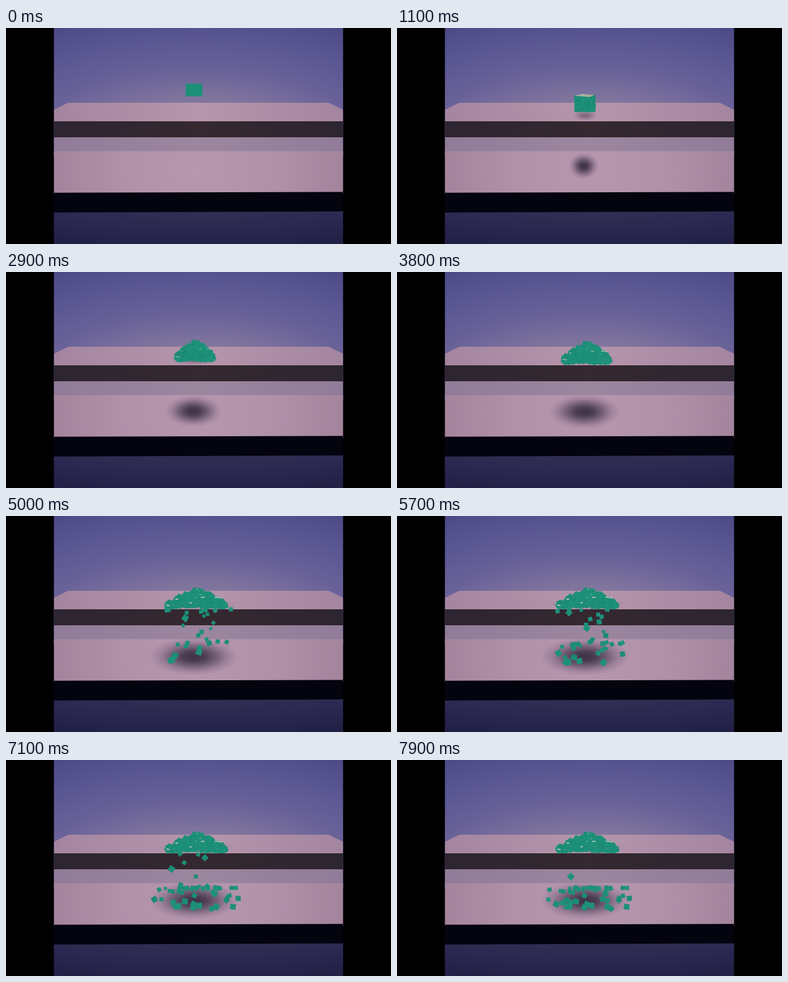
Recreate the animation shown at these times as an HTML page with a canvas. Size 600 by 338 pixels, loop 8 s.

```html
<!DOCTYPE html>
<html lang="en">
<head>
<meta charset="utf-8">
<title>Falling cubes</title>
<style>
html, body { margin: 0; width: 100%; height: 100%; overflow: hidden; background: #000; }
canvas { display: block; width: 600px; height: 338px; }
</style>
</head>
<body>
<canvas id="stage" width="600" height="338"></canvas>
<script>
const ctx = document.getElementById('stage').getContext('2d');
const LOOP = 8000, STEP = 100;
const LAND = 1100, SETTLED = 5000;
const LEFT = 74.67, RIGHT = 525.33, EDGE_Y = 146;

let seed = 71;
const rand = () => (seed = (seed * 16807) % 2147483647) / 2147483647;
const range = (a, b) => a + (b - a) * rand();
const bell = spread => (rand() + rand() + rand() - 1.5) * spread;
const mix = (a, b, p) => a + (b - a) * p;
const clamp = (v, a = 0, b = 1) => Math.min(b, Math.max(a, v));

const heapCubes = Array.from({ length: 230 }, (_, i) => ({
  u: rand(), v: rand(), angle: range(-.8, .8), scale: range(.7, 1.15),
  pale: i % 9 === 0, tint: range(-4, 4)
}));

// Cubes spill steadily over the edge, with a few late stragglers.
const SPILLED = 62;
const spillCubes = Array.from({ length: SPILLED }, (_, i) => {
  const q = i / SPILLED, depth = rand() ** 2.5, x0 = 291 + bell(50);
  return {
    start: 3900 + 2500 * q + 1100 * q ** 6,
    x0, x1: x0 + bell(mix(40, 90, depth)), y1: 200 + 34 * depth,
    size: range(4.5, 7) + 3 * depth, angle: range(-.6, .6), spin: range(-4, 4), tint: range(-4, 4)
  };
}).sort((a, b) => a.y1 - b.y1);

function shape(points, fill) {
  ctx.fillStyle = fill;
  ctx.beginPath();
  points.forEach(([x, y]) => ctx.lineTo(x, y));
  ctx.closePath();
  ctx.fill();
}

const slab = (top, bottom, fill) =>
  shape([[LEFT, top], [RIGHT, top], [RIGHT, bottom], [LEFT, bottom]], fill);

function addStops(gradient, colors) {
  colors.forEach((color, i) => gradient.addColorStop(i / (colors.length - 1), color));
  return gradient;
}

const across = (edge, middle) =>
  addStops(ctx.createLinearGradient(LEFT, 0, RIGHT, 0), [edge, middle, edge]);

// Elliptical gradient filling the area between two heights.
function glow(cy, ry, aspect, top, bottom, colors) {
  ctx.save();
  ctx.translate(300, cy);
  ctx.scale(aspect, 1);
  ctx.fillStyle = addStops(ctx.createRadialGradient(0, 0, 0, 0, 0, ry), colors);
  ctx.fillRect(-300 / aspect, top - cy, 600 / aspect, bottom - top);
  ctx.restore();
}

function blob(x, y, rx, ry, strength) {
  ctx.save();
  ctx.translate(x, y);
  ctx.scale(rx, ry);
  ctx.globalAlpha = strength;
  ctx.fillStyle = addStops(ctx.createRadialGradient(0, 0, 0, 0, 0, 1), [
    'rgba(40,32,50,1)', 'rgba(44,35,55,.9)', 'rgba(56,45,70,.62)', 'rgba(70,56,84,.25)', 'rgba(90,72,105,0)'
  ]);
  ctx.fillRect(-1, -1, 2, 2);
  ctx.restore();
}

function cube(x, y, size, angle, tint, pale = 0) {
  ctx.save();
  ctx.translate(x, y);
  ctx.rotate(angle);
  ctx.fillStyle = `rgb(${29 + tint / 2},${143 + tint},${120 + tint})`;
  ctx.fillRect(-size / 2, -size / 2, size, size);
  if (pale > 0) {
    ctx.rotate(-angle * .8);
    ctx.globalAlpha = pale;
    ctx.fillStyle = '#c3c9b8';
    ctx.fillRect(-size / 2, -size / 2, size, 1.6);
  }
  ctx.restore();
}

function drawScene() {
  glow(215, 250, 1.9, 0, 200, ['#8e80a2', '#8a7da1', '#82769e', '#696299', '#595692', '#4b4884']);
  shape([[97, 117], [503, 117], [RIGHT, 128], [RIGHT, EDGE_Y], [LEFT, EDGE_Y], [LEFT, 128]],
    across('#a485a0', '#b696ac'));
  slab(EDGE_Y, 171, across('#2d2531', '#35282f'));
  slab(171, 192.5, across('#907c99', '#9c869f'));
  glow(220, 240, 1, 192.5, 260, ['#b797ae', '#b091a9', '#a2829b']);
  glow(215, 130, 4, 285, 338, ['#38324f', '#38324f', '#343052', '#2b2952', '#222046']);
  shape([[LEFT, 257.7], [RIGHT, 256.5], [RIGHT, 287], [LEFT, 288.7]], '#04040f');
}

// One falling block lands, breaks up and slumps into a dome.
function heapAt(t) {
  const fall = clamp(t / 1000) ** 2;
  const spread = clamp((t - LAND) / (SETTLED - LAND));
  const broken = clamp((t - 600) / 500);
  const half = mix(13, 17, fall) + 33 * spread;
  const peak = mix(87, 104, fall) + 7 * spread ** 2;
  const base = mix(107, 132, fall) + 14 * clamp(spread * 1.35);
  const shoulder = mix(1, .3, clamp(spread * 3));
  const middle = 293 + 4 * spread;
  return {
    fall, spread, broken, half, peak, base, middle, left: middle - half, right: middle + half,
    size: broken * (5 + 3 * Math.sin(Math.PI * spread) + 1.5 * spread),
    inset: broken * (.7 + 2.5 * clamp(spread * 3)),
    top: u => base - (base - peak) * (1 - (1 - shoulder) * Math.abs(2 * u - 1) ** 1.3)
  };
}

function drawHeap(heap) {
  const { left, right, peak, base, size, inset, spread, broken } = heap;
  const outline = [[right - inset, base - inset], [left + inset, base - inset]];
  for (let u = 0; u <= 1; u += 1 / 16) {
    outline.push([mix(left + inset, right - inset, u), heap.top(u) + inset]);
  }
  shape(outline, '#1e8f78');
  for (const c of heapCubes) {
    const s = size * c.scale;
    if (s < 1) continue;
    const x = mix(left + s / 2, right - s / 2, c.u);
    const y = mix(heap.top((x - left) / (right - left)) + s / 2, base - s / 2, c.v);
    cube(x, y, s, c.angle * mix(.4, 1, clamp(spread * 3)), c.tint, c.pale ? spread : 0);
  }
  ctx.globalAlpha = broken * clamp(1 - spread * 5);
  shape([[left, peak + 2], [left + 13, peak - 1], [right - 2, peak + 1], [left + 24, peak + 4]], '#a9ada0');
  ctx.globalAlpha = 1;
}

function drawSpill(t) {
  for (const c of spillCubes) {
    const age = t - c.start;
    if (age < 0) continue;
    const drop = c.y1 - EDGE_Y, fallTime = 90 * Math.sqrt(drop);
    const rest = Math.max(0, age - fallTime) / 1000;
    const x = mix(c.x0, c.x1, 1 - Math.exp(-rest * 2.4));
    const bounce = 9 * Math.abs(Math.sin(rest * 6)) * Math.exp(-rest * 4);
    const y = EDGE_Y + drop * clamp(age / fallTime) ** 2 - bounce;
    const angle = (c.angle + c.spin * Math.min(age, fallTime) / 1000) * mix(.2, 1, Math.exp(-rest * 3));
    cube(x, y, c.size, angle, c.tint);
  }
}

function draw(t) {
  const heap = heapAt(t);
  ctx.fillStyle = '#000';
  ctx.fillRect(0, 0, 600, 338);
  ctx.save();
  ctx.beginPath();
  ctx.rect(LEFT, 0, RIGHT - LEFT, 338);
  ctx.clip();
  drawScene();
  blob(291 + 2 * heap.spread, 216 + 4 * heap.spread, heap.half * 1.4, 21 + 9 * heap.spread, .85 * heap.fall);
  ctx.save();
  ctx.beginPath();
  ctx.rect(LEFT, 117, RIGHT - LEFT, EDGE_Y - 117);
  ctx.clip();
  blob(heap.middle, 137, heap.half * 1.2, 9, .4 * heap.fall);
  ctx.restore();
  drawHeap(heap);
  drawSpill(t);
  ctx.restore();
}

const origin = performance.now();
function tick() {
  const t = (performance.now() - origin) % LOOP;
  draw(Math.floor(t / STEP) * STEP);
  requestAnimationFrame(tick);
}
tick();
</script>
</body>
</html>
```
